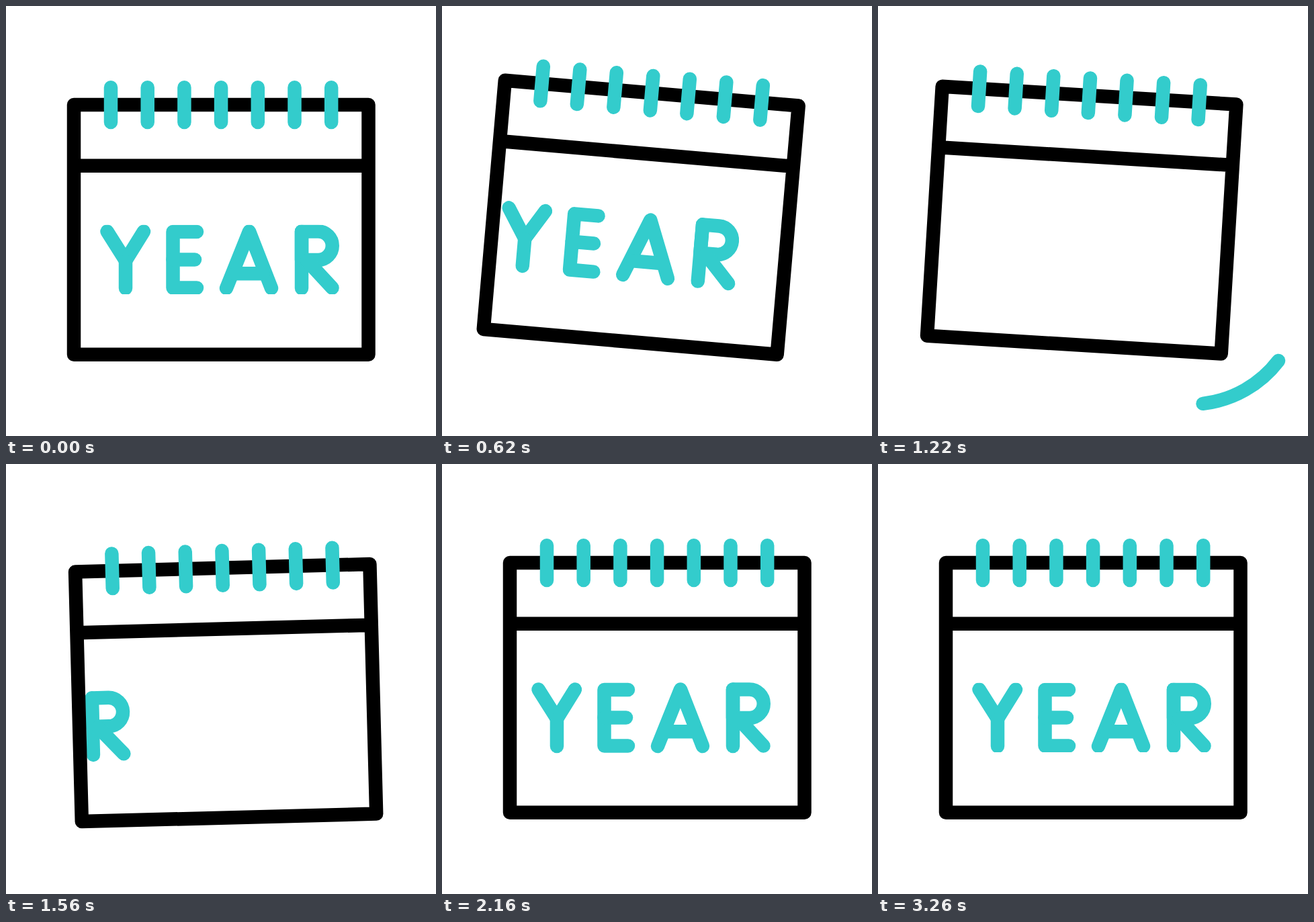
Recreate the animation shown at these times as an HTML page. Size 640 px wide and 640 px high, loop 3380 ms.

```html
<!DOCTYPE html>
<html lang="en">
<head>
<meta charset="utf-8">
<title>Year calendar</title>
<style>
  html, body { margin: 0; width: 100%; height: 100%; overflow: hidden; background: #fff; }
  svg { display: block; width: 100%; height: 100%; }
  path { fill: none; stroke-linecap: round; stroke-linejoin: round; }
  .teal { stroke: #33cccc; stroke-width: 20.5; }
  .black { stroke: #000; stroke-width: 20.5; }
  #ink { stroke: #000; stroke-width: 22.5; }
</style>
</head>
<body>
<svg viewBox="0 0 640 640">
  <defs>
    <clipPath id="page"><rect id="window" x="111" width="418.5"/></clipPath>
  </defs>
  <g class="teal">
    <path id="swooshLeft" pathLength="1" d="M387 573.4A165 165 0 0 0 596 528" transform="matrix(-1 0 0 1 658 -16)"/>
    <path id="swooshRight" pathLength="1" d="M387 573.4A165 165 0 0 0 596 528"/>
  </g>
  <g id="calendar">
    <g clip-path="url(#page)"><g id="word" class="teal"></g></g>
    <path class="black" d="M101 147H539.5V518.7H101ZM101 237.7H539.5"/>
    <path id="rings" class="teal"/>
  </g>
  <g id="ink"></g>
</svg>
<script>
  const LOOP = 3380;
  const $ = id => document.getElementById(id);

  // Each stroke runs in the direction it is drawn.
  const strokes = [
    'M150.5 335.5L178 379L205 335.5', 'M178 420V380',
    'M284 336H248.5V419.5H284', 'M281 377.5H248.5',
    'M328 420L362 335.5L395 420', 'M341 398.3H383',
    'M440 335.5V420', 'M440 335.5V378H464.5A21 21 0 0 0 464.5 335.5H440', 'M448 379L485.5 419.5'
  ];
  const letters = strokes.map(d => `<path pathLength="1" d="${d}"/>`).join('');
  $('word').innerHTML = $('ink').innerHTML = letters;
  const inkPaths = [...$('ink').children];

  $('rings').setAttribute('d',
    Array.from({ length: 7 }, (_, i) => `M${156 + i * 54.7} 121.3V173`).join(''));

  const lerp = (a, b, p) => a + (b - a) * p;
  const span = (t, a, b) => Math.min(1, Math.max(0, (t - a) / (b - a)));
  const smooth = (t, a, b) => { const u = span(t, a, b); return u * u * (3 - 2 * u); };

  // time, x, y, angle, dip of the path towards the right-hand end
  const poses = [
    [180, 0, 0, 0, 0],
    [650, -24.3, -18.3, 5, 0],
    [965, 23.8, 5.2, -5, 60],
    [1304, -24.3, -19, 5, 60],
    [1731, 23.6, 5.7, -5, 72],
    [2142, 0, 0, 0, 0]
  ];

  function poseAt(t) {
    let i = 1;
    while (i < poses.length - 1 && t > poses[i][0]) i++;
    const from = poses[i - 1], to = poses[i];
    const p = smooth(t, from[0], to[0]);
    const [x, y, angle] = [1, 2, 3].map(k => lerp(from[k], to[k], p));
    const right = to[1] > from[1] ? p : 1 - p;
    return { x, y: y + to[4] * right * right * (1 - right), angle };
  }

  function wordShift(t) {
    if (t < 650) return -27.5 * smooth(t, 180, 640);
    if (t < 1240) return lerp(-27.5, 420, span(t, 650, 1230) ** 2);
    return lerp(-420, 0, smooth(t, 1245, 2237));
  }

  function trim(path, start, end) {
    const shown = end > start && end > 0 && start < 1;
    path.style.display = shown ? '' : 'none';
    if (!shown) return;
    path.style.strokeDasharray = `${end - start} 2`;
    path.style.strokeDashoffset = -start;
  }

  function draw(t) {
    const { x, y, angle } = poseAt(t);
    $('calendar').setAttribute('transform', `translate(${x} ${y}) rotate(${angle} 320.2 333)`);
    $('word').setAttribute('transform', `translate(${wordShift(t)} 0)`);

    // The resting word sits in a slightly tighter window.
    const still = t <= 180 || t >= 2240;
    $('window').setAttribute('y', still ? 325.8 : 248);
    $('window').setAttribute('height', still ? 103.2 : 260);

    trim($('swooshLeft'), smooth(t, 310, 600), smooth(t, 190, 430));
    trim($('swooshRight'), smooth(t, 1040, 1440), smooth(t, 830, 1040));

    const start = smooth(t, 2810, 3250), end = smooth(t, 2322, 2808);
    inkPaths.forEach(path => trim(path, start, end));
  }

  const began = performance.now();
  function frame() {
    draw((performance.now() - began) % LOOP);
    requestAnimationFrame(frame);
  }
  draw(0);
  requestAnimationFrame(frame);
</script>
</body>
</html>
```
